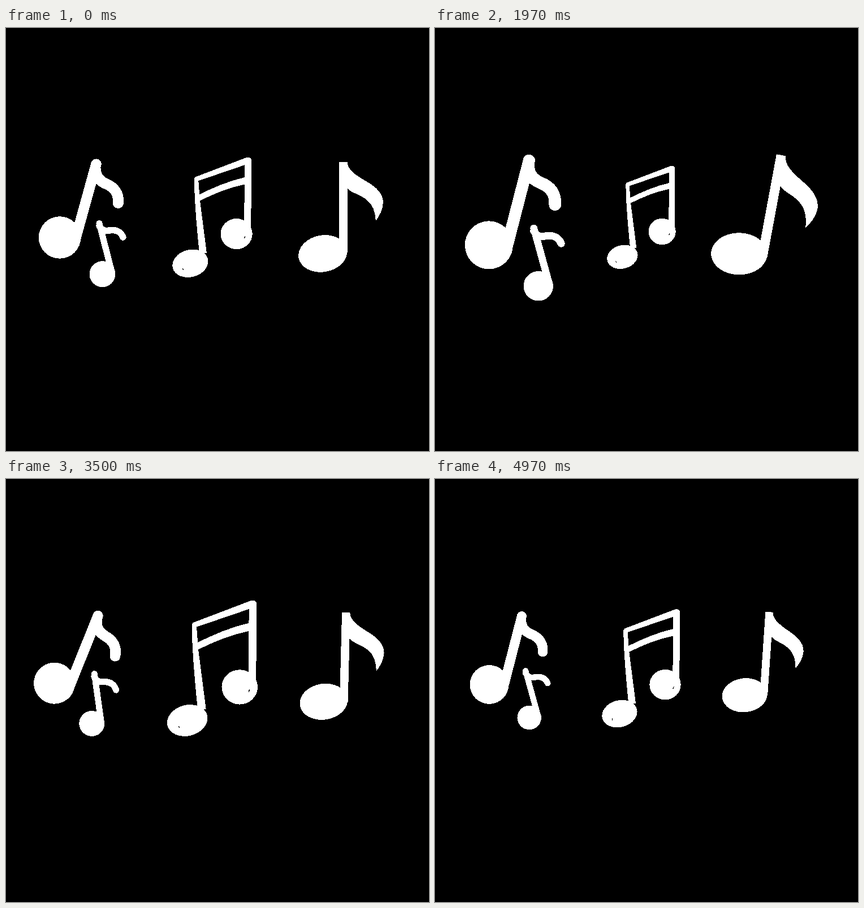
An HTML page that plays this animation: 748x748 px, repeating every 5.01 s.

```html
<!DOCTYPE html>
<html lang="en">
<head>
<meta charset="utf-8">
<title>Dancing notes</title>
<style>
  html, body { margin: 0; width: 100%; height: 100%; overflow: hidden; background: #000; }
  svg { display: block; width: 100vw; height: 100vh; }
  .line { fill: none; stroke: #fff; }
  .round { stroke-linecap: round; }
  .nick { fill: none; stroke: #000; stroke-width: 1.2; }
</style>
</head>
<body>
<svg viewBox="0 0 748 748" fill="#fff" shape-rendering="crispEdges">
  <g id="pair">
    <circle cx="95" cy="370.5" r="37.3"/>
    <circle cx="159.5" cy="240.5" r="9.3"/>
    <path class="line" stroke-width="18.5" d="M159.5 240.5L122 376"/>
    <path class="line round" stroke-width="19" d="M158.5 250C158.5 263 166 271 178 276C192 282 200 293 198.5 309.5"/>
    <circle cx="170.5" cy="435.3" r="23"/>
    <circle cx="165" cy="345.5" r="5.6"/>
    <path class="line" stroke-width="11.2" d="M165 345.5L187.5 433"/>
    <path class="line round" stroke-width="11.5" d="M165 350C170 359 176 359 183 358C194 356 203 360 207 370"/>
  </g>
  <g id="beamed">
    <path d="M333 267Q335 261 340 265L343 305L355 398L342 398Q333 310 333 267Z"/>
    <path d="M334 264L426 229Q434 228 434 236L433 356L421 345L422 242.5L340 270.5Z"/>
    <path d="M341 295C365 283 395 270 423 264V276.5C395 282 368 293 342 306Z"/>
    <ellipse cx="326" cy="416" rx="32" ry="24" transform="rotate(-15 326 416)"/>
    <ellipse cx="407.5" cy="364" rx="28" ry="27"/>
    <path class="nick" d="M312.5 424.5L313.5 427.500M423 367.500L421.5 371.500"/>
  </g>
  <g id="single">
    <ellipse cx="560.2" cy="399" rx="43.5" ry="32.5" transform="rotate(-10 560.2 399)"/>
    <path d="M589 236.7H603.5C604 252 622 262 637 271C655 281 667 293 667 308C667 321 660 333 654 341C653 325 649 312 637 303C626 294 611 292 604 284V398L589 380Z"/>
  </g>
</svg>
<script>
const LOOP = 5010, STEPS = 150;

const mix = (a, b, u) => a + (b - a) * (1 - Math.cos(Math.PI * u)) / 2;

// Index of the span of rising times that holds t.
const spanAt = (times, t) => times.findLastIndex((s, i) => s <= t && i < times.length - 1);

// Both outer notes swell and shrink together, turning at these seconds.
const turns = [-.2, .2, .71, 1.07, 1.43, 1.95, 2.4, 2.88, 3.3, 3.74, 4.21, 4.63, 5.13];
function pulse(t) {
  const i = spanAt(turns, t), u = (t - turns[i]) / (turns[i + 1] - turns[i]);
  return mix(.855, 1.142, i % 2 ? 1 - u : u);
}

const beat = t => 1.003 + .146 * Math.sin(5.71 * t);

// Key poses: seconds, sideways and downward drift, tilt in degrees.
function wander(keys) {
  const times = keys.map(key => key[0]);
  return t => {
    const i = spanAt(times, t), u = (t - times[i]) / (times[i + 1] - times[i]);
    return keys[i].slice(1).map((v, k) => mix(v, keys[i + 1][k + 1], u));
  };
}

const notes = [
  {
    id: "pair", pivot: [135, 345], scale: pulse,
    pose: wander([[0, 0, 0, 0], [.73, -6, -4, 11], [1.27, -5, 7.5, -3], [1.97, 5.5, 9, -1],
      [2.87, 3, 4, 8.7], [3.74, -10, -6, 6], [4.07, -9, 4.5, 3.7], [4.64, 7, -7, 1], [4.97, -2.5, -5.7, -1]])
  },
  { id: "beamed", pivot: [365, 335], scale: beat, pose: () => [0, 0, 0] },
  {
    id: "single", pivot: [592, 334], scale: pulse,
    pose: wander([[0, 0, 0, 0], [.73, -2, 7, 4.9], [1.27, 10, 3, .7], [1.97, -5, -1, 10.5],
      [2.87, -8, -.5, .7], [4.07, 11.5, -5, 2.2], [4.97, -11, -9.5, 3.9]])
  }
];
for (const note of notes) note.node = document.getElementById(note.id);

function draw(ms) {
  // Thirty poses a second, each shown from the nearest 10 ms.
  const step = Math.min(STEPS - 1, Math.floor((Math.floor(ms / 10) * 10 + 5) * .03));
  const t = Math.min(4.969, Math.round(step * 10 / 3) / 100);
  for (const { node, pivot: [px, py], pose, scale } of notes) {
    const [dx, dy, tilt] = pose(t);
    node.setAttribute("transform",
      `translate(${px + dx} ${py + dy}) rotate(${tilt}) scale(${scale(t)}) translate(${-px} ${-py})`);
  }
}

const start = performance.now();
function tick() {
  draw((performance.now() - start) % LOOP);
  requestAnimationFrame(tick);
}
draw(0);
requestAnimationFrame(tick);
</script>
</body>
</html>
```
